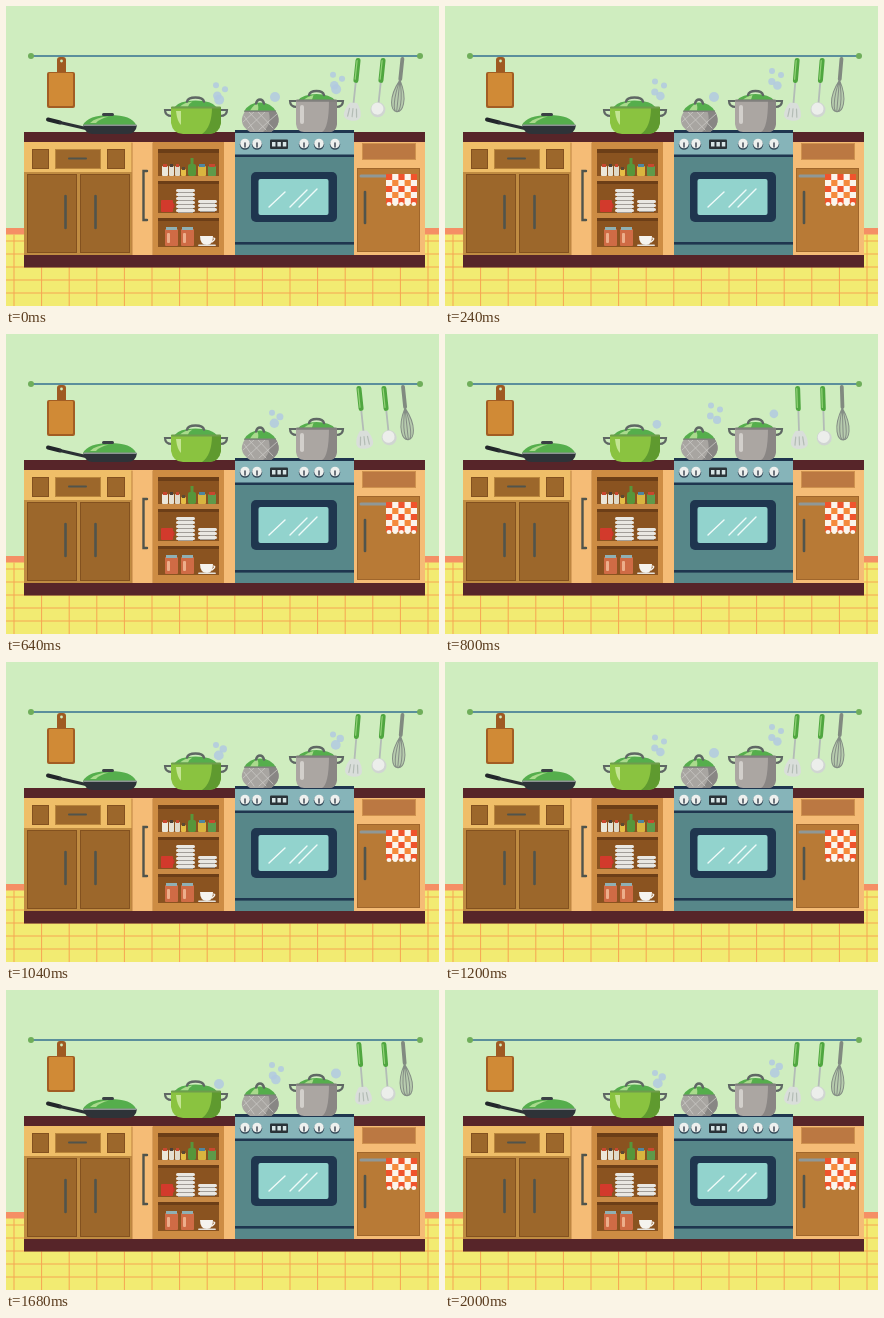
Animation of 433 by 300 pixels, one loop 2.08 s. Source, as an HTML page:

```html
<!DOCTYPE html>
<html lang="en">
<head>
<meta charset="utf-8">
<title>Kitchen</title>
<style>
html, body { margin: 0; width: 100%; height: 100%; overflow: hidden; background: #cfedbf; }
svg { display: block; width: 100%; height: 100%; }
</style>
</head>
<body>
<svg id="stage" viewBox="0 0 433 300"></svg>
<script>
const NS = "http://www.w3.org/2000/svg";
const stage = document.getElementById("stage");

function add(tag, attrs, parent = stage) {
  const el = document.createElementNS(NS, tag);
  for (const key in attrs) el.setAttribute(key, attrs[key]);
  return parent.appendChild(el);
}
const rect = (x, y, width, height, fill, rx = 0, parent) =>
  add("rect", { x, y, width, height, fill, rx }, parent);
const oval = (cx, cy, rx, ry, fill, parent) => add("ellipse", { cx, cy, rx, ry, fill }, parent);
const path = (d, fill, parent) => add("path", { d, fill }, parent);
const line = (d, stroke, width = 1, parent) =>
  add("path", { d, stroke, "stroke-width": width, fill: "none", "stroke-linecap": "round" }, parent);

const WOOD = "#9c672b", SHADE = "#83511f", FRAME = "#f5bc76", LIGHT = "#efbe68", TOP = "#572529",
  TEAL = "#578789", NAVY = "#1f364f", BAR = "#50544c", LID = "#55ae4c", SHINE = "#a9db8c", STEEL = "#aba6a2";

function room() {
  rect(0, 0, 433, 300, "#cfedbf");
  rect(0, 228, 433, 72, "#f2eb72");
  for (let x = 8; x < 433; x += 27.6) line(`M${x} 229V300`, "#f5a552", 1);
  for (let y = 235; y < 300; y += 13) line(`M0 ${y}H433`, "#f5a552", 1);
  rect(0, 222, 433, 6.5, "#f58f65");
  line("M25 50H414", "#5b8f9c", 2.2);
  oval(25, 50, 3, 3, "#6fae5a");
  oval(414, 50, 3, 3, "#6fae5a");
}

function board() {
  rect(51, 51, 9, 18, "#9f5a22", 3);
  oval(55.5, 55, 1.4, 1.4, "#cfedbf");
  rect(41, 66, 28, 36, "#a25d23", 2);
  rect(43, 67, 24, 33, "#d08a36", 1);
}

function drawer(x, y, w, h, fill, edge = SHADE) {
  rect(x, y, w, h, edge);
  rect(x + 1, y + 1, w - 2, h - 2, fill);
}

function cabinets() {
  rect(18, 136, 401, 114, FRAME);
  rect(18, 136, 108, 113, LIGHT);
  rect(18, 166, 108, 83, "#c08c42");
  drawer(26, 143, 17, 20, WOOD);
  drawer(49, 143, 46, 20, WOOD, "#b9853c");
  drawer(101, 143, 18, 20, WOOD);
  line("M63 152.5H80", BAR, 2);
  for (const x of [21, 74]) drawer(x, 168, 50, 79, WOOD);
  line("M59.500 190V222M89.500 190V222", BAR, 2.6);
  line("M126 137V249M147 137V249", "#bd8140", 1);
  line("M141 165H137.500V214H141", BAR, 2.4);

  rect(147, 136, 71, 113, "#cd8c43");
  rect(152, 143, 61, 98, "#8a5320");
  rect(152, 143, 61, 4, "#6c3e17");
  for (const y of [170, 207]) {
    rect(152, y, 61, 5, "#c98a45");
    rect(152, y + 5, 61, 3, "#6c3e17");
  }
  shelves();

  drawer(356, 137, 54, 17, "#bb7842", "#cf914e");
  drawer(351, 162, 63, 84, "#b87a36", "#a0662b");
  line("M359 186V217", BAR, 2.6);
  rect(18, 126, 212, 10, TOP);
  rect(346, 126, 73, 10, TOP);
  rect(18, 249, 401, 12.5, TOP);
  towel();
}

function jar(x, y, w, h, fill, cap) {
  rect(x, y, w, h, fill, 1);
  rect(x + 1, y - 2, w - 2, 3, cap);
}

function bowls(x, y, w, count) {
  for (let i = 0; i < count; i++) {
    rect(x, y + i * 4, w, 3, "#e9e7e2", 1.5);
    rect(x + 2, y + 3 + i * 4, w - 4, 1, "#a19d98");
  }
}

function shelves() {
  jar(156, 160, 6, 10, "#ece7da", "#c8472f");
  jar(163, 160, 5, 10, "#e5e0d2", "#4a4038");
  jar(169, 160, 5, 10, "#dfd9c9", "#c8472f");
  jar(175, 163, 5, 7, "#e6bd46", "#5b4a33");
  rect(182, 158, 8, 12, "#57963a", 2);
  rect(184.5, 152, 3, 8, "#57963a");
  jar(192, 160, 8, 10, "#d9b53f", "#4f86a0");
  jar(202, 160, 8, 10, "#5f9a4a", "#c8472f");

  line("M166 197Q170 199 166 203", "#c9342a", 1.5);
  rect(155, 194, 12, 12, "#d23a2c", 1);
  bowls(170, 183, 19, 6);
  bowls(192, 194, 19, 3);

  for (const x of [159, 175]) {
    jar(x, 223, 13, 17, "#cf6b45", "#8fb0b4");
    rect(x + 2, 227, 3, 10, "#edae8b", 1);
  }
  path("M194 230H207Q207 239 201 239Q194 239 194 230Z", "#f5f3ee");
  line("M207 232Q211 232 206 236", "#f5f3ee", 1.2);
  rect(192, 238.5, 18, 1.6, "#e4e1db", 1);
}

function towel() {
  line("M355 170H409", "#8f9898", 3);
  rect(380, 168, 31, 30, "#fbf5ec");
  for (let r = 0; r < 5; r++)
    for (let c = 0; c < 5; c++)
      if ((r + c) % 2 == 0) rect(380 + c * 6.2, 168 + r * 6, 6.2, 6, r % 2 ? "#f58a3c" : "#f0542d");
  for (let c = 0; c < 5; c++) oval(383 + c * 6.2, 198, 2.4, 2, "#fbf5ec");
}

function stove() {
  rect(229, 126, 119, 123, TEAL);
  rect(229, 124, 119, 3, NAVY);
  rect(229, 127, 119, 22, "#86b4b9");
  rect(229, 148.5, 119, 2.5, NAVY);
  rect(264, 133.5, 18, 9.5, "#2a3338", 1);
  for (const x of [266, 271.4, 276.8]) rect(x, 136, 3.5, 4.5, "#d7e5e6");
  for (const x of [239, 251, 298, 313, 329]) {
    oval(x, 138.5, 5.2, 5.2, "#354b5a");
    oval(x, 137.5, 4.8, 4.8, "#edf0ee");
    line(`M${x} 137V141`, "#4d5560", 1.6);
  }
  rect(245, 166, 86, 50, NAVY, 5);
  rect(252.5, 173, 70, 36, "#92d3cd", 2);
  line("M263 201L279 186M284 201L301 184M293 201L311 183", "#effbf9", 1.4);
  rect(229, 236, 119, 2.6, NAVY);
}

function pan() {
  line("M42 113.500L54 116.500", "#22262a", 4);
  line("M54 116.500L80 122.500", "#2b3034", 3);
  path("M77 119H131Q130 128 121 128H87Q79 128 77 119Z", "#2e3338");
  path("M77 119Q82 109 104 109Q126 109 130 119Z", LID);
  path("M84 117Q90 111 103 110.500Q93 113 90 117Z", SHINE);
  rect(77, 118.500, 54, 1.500, "#8c9392", 1);
  rect(96, 107, 12, 3, "#3a4044", 1.5);
}

// glass-green lid with a steel rim and a loop on top
function lid(x1, x2, top, base, loop) {
  const mid = (x1 + x2) / 2;
  path(`M${x1} ${base}Q${x1 + 5} ${top} ${mid} ${top}Q${x2 - 5} ${top} ${x2} ${base}Z`, LID);
  path(`M${x1 + 6} ${base - 1}Q${x1 + 10} ${top + 2} ${mid - 3} ${top + 1}Q${x1 + 15} ${top + 3} ${x1 + 14} ${base - 1}Z`, SHINE);
  line(`M${mid - loop} ${top + 1}Q${mid - loop + 1} ${top - 3} ${mid} ${top - 3}Q${mid + loop - 1} ${top - 3} ${mid + loop} ${top + 1}`, "#5f6764", 2.4);
}

function ears(x1, x2, y) {
  line(`M${x1} ${y}H${x1 - 7}Q${x1 - 7} ${y + 6} ${x1} ${y + 6}M${x2} ${y}H${x2 + 7}Q${x2 + 7} ${y + 6} ${x2} ${y + 6}`, "#5f6764", 2.2);
}

function greenPot() {
  ears(166, 214, 104);
  path("M165 101H215V117Q213 128 203 128H177Q167 128 165 117Z", "#8ac340");
  path("M206 101H215V117Q213 128 203 128H196Q206 121 206 101Z", "#5f9a2f");
  path("M170 105H175V119Q171 115 170 105Z", "#c4e593");
  lid(168, 211, 94.500, 101.500, 8.500);
  rect(165, 100.500, 50, 2, "#6f9d4c", 1);
}

function smallPot() {
  path("M240 104H269Q278 117 265 126H244Q230 117 240 104Z", "#a8a5a1");
  path("M262 104H269Q278 117 265 126H257Q267 117 262 104Z", "#888684");
  line("M238 110L248 124M243 106L260 124M252 106L267 122M237 116L248 106M242 122L259 106M253 124L271 108", "#cac8c4", .8);
  lid(238, 270, 96.500, 105.500, 4);
  rect(238, 104.500, 32, 1.600, "#82827f", 1);
}

function tallPot() {
  ears(291, 330, 95);
  path("M290 94H331V118Q330 126 323 126H298Q291 126 290 118Z", STEEL);
  path("M323 94H331V118Q330 126 323 126H316Q323 122 323 94Z", "#8a8684");
  rect(294, 99, 4, 19, "#d2cfcb", 2);
  lid(292, 329, 88, 94.500, 7.500);
  rect(290, 93.500, 41, 2.200, "#807f7c", 1);
}

function grip(g, x) {
  line(`M${x} 77V98`, "#b3bbb7", 1.8, g);
  rect(x - 2.5, 52, 5, 25, "#4fa63f", 2.5, g);
  rect(x - 1.5, 54, 1.2, 20, "#92d277", .6, g);
}

function utensils() {
  const spatula = add("g", {});
  grip(spatula, 352.5);
  path("M349 97H356Q361 103 361 110Q360 115 352.500 115Q345 115 344 110Q344 103 349 97Z", "#d9deda", spatula);
  line("M349 103L348 111M352.500 103V111M356 103L357 111", "#b3bcb5", 1.2, spatula);

  const ladle = add("g", {});
  grip(ladle, 377.5);
  oval(377.5, 104, 7.5, 7.5, "#d0d5d2", ladle);
  oval(377, 103, 6, 6, "#eceeeb", ladle);

  const whisk = add("g", {});
  rect(394.8, 51, 3.8, 24, "#818a80", 1.8, whisk);
  add("path", { d: "M396.500 74C386 94 391 106 396.500 106C402 106 407 94 396.500 74Z", fill: "#9aa39a", opacity: .45 }, whisk);
  line("M396.500 74C386 94 391 106 396.500 106C402 106 407 94 396.500 74C391.500 94 393 106 396.500 106C400 106 401.500 94 396.500 74V106", "#848d85", 1, whisk);

  return [[spatula, 352.5], [ladle, 377.5], [whisk, 396.5]];
}

// x, y: where bubbles are born; start, wait, fade: beats within the cycle
const puffs = [
  { x: 213, y: 94, start: 5.8, wait: .2, fade: 7.8 },
  { x: 269, y: 91, start: 0, wait: 1.7, fade: 7.3 },
  { x: 330, y: 83.5, start: 5.8, wait: .2, fade: 7.8 }
];
// sideways drift and distance behind the first bubble
const cluster = [[-3, 0], [6, 4], [-4, 10.5], [6, 14.5]];
const SPEED = 3.7;

room();
const steam = puffs.map(() => cluster.map(() => oval(0, 0, 0, 0, "#b2c9e0")));
board();
cabinets();
stove();
pan();
greenPot();
smallPot();
tallPot();
const hung = utensils();

const clamp = v => Math.max(0, Math.min(1, v));

function draw(beat) {
  const angle = 6 * Math.cos(beat * Math.PI / 5);
  for (const [el, x] of hung) el.setAttribute("transform", `rotate(${angle} ${x} 50)`);
  puffs.forEach((p, i) => {
    const age = (beat - p.start + 20) % 10;
    const rise = Math.max(0, age - p.wait) * SPEED;
    const fade = 1 - clamp((age - p.fade) / 1.2);
    cluster.forEach(([dx, lag], j) => {
      const up = rise - lag;
      const r = up < 0 ? 0 : 5 - 2 * clamp(up / 11);
      const el = steam[i][j];
      el.setAttribute("cx", p.x + dx * clamp(up / 10));
      el.setAttribute("cy", p.y - up);
      el.setAttribute("rx", r);
      el.setAttribute("ry", r);
      el.setAttribute("opacity", .85 * fade);
    });
  });
}

// 80 ms ticks; every fifth tick repeats the beat before it
function beatAt(ms) {
  const k = Math.floor(ms % 2080 / 80) - 2;
  return k < 0 ? 0 : k - Math.floor(k / 5);
}

const begin = performance.now();
function tick() {
  draw(beatAt(performance.now() - begin));
  requestAnimationFrame(tick);
}
tick();
</script>
</body>
</html>
```
